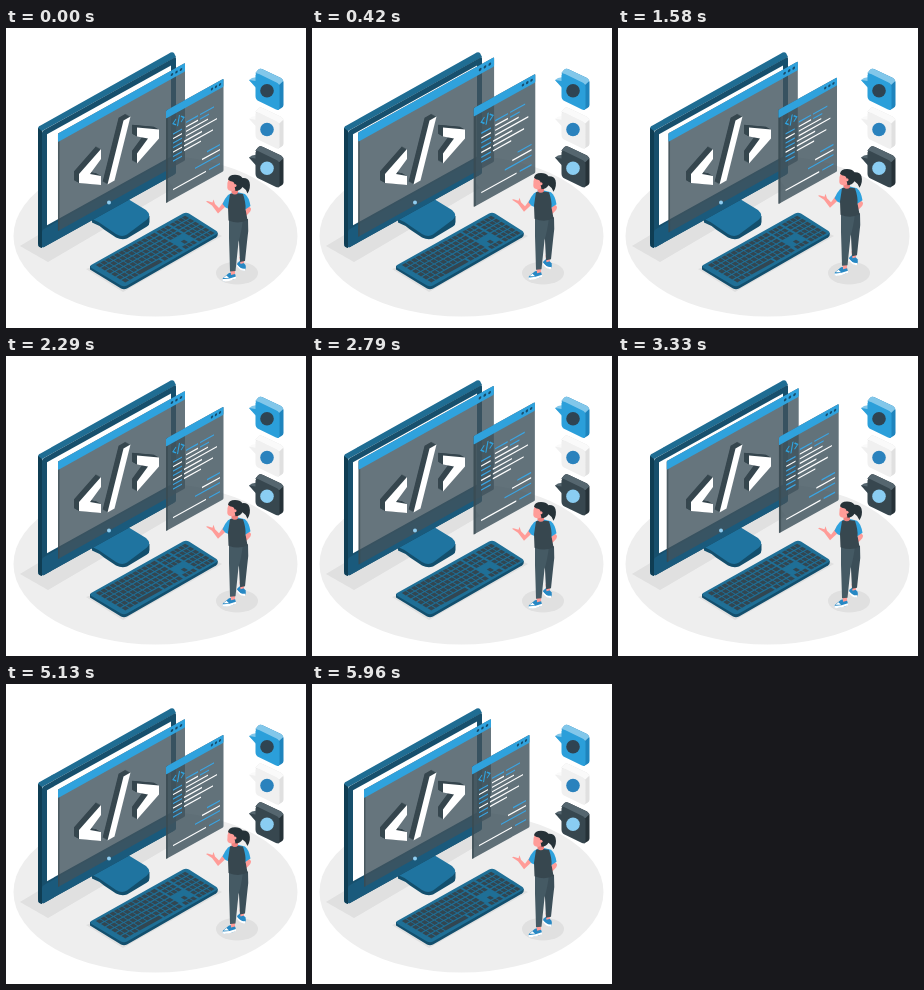
These frames come from a looping animation (300 by 300 pixels, 6 s). An HTML page:

```html
<!DOCTYPE html>
<html lang="en">
<head>
<meta charset="utf-8">
<title>Front-end developer</title>
<style>
  /* Registered so the drawing is repainted sharply at every scale. */
  @property --zoom { syntax: "<number>"; inherits: false; initial-value: 1; }
  @property --lift { syntax: "<length>"; inherits: false; initial-value: 0px; }
  html, body { margin: 0; width: 100%; height: 100%; overflow: hidden; background: #fff; }
  svg { display: block; width: 100vw; height: 100vh; }
  .window {
    transform-origin: 135px 118px;
    transform: scale(var(--zoom));
    animation: pulse 6s linear infinite;
  }
  #girl { transform: translateY(var(--lift)); animation: float 3s linear infinite; }
  @keyframes pulse {
    0%, 30%, 40%, 59%, 100% { --zoom: 1; }
    10%, 50% { --zoom: 1.1; }
  }
  @keyframes float {
    0%, 100% { --lift: 0px; }
    50% { --lift: -6px; }
  }
</style>
</head>
<body>
<svg viewBox="0 0 300 300">
  <ellipse cx="149.500" cy="208" rx="142" ry="80.500" fill="#eee"/>
  <path d="M14 218L34 206 160 150 168 160 42 234Z" fill="#e0e0e0"/>
  <path d="M80 241L117 264 216 208 200 200Z" fill="#e0e0e0"/>
  <ellipse cx="231" cy="245" rx="21" ry="11.500" fill="#e0e0e0"/>

  <!-- stand -->
  <path d="M86 191V194.500Q93 197 98 201.500L110 209.500Q116 212.500 121 210.500L141 198.500Q143.500 197 143.500 194V188Z" fill="#134f6d"/>
  <path d="M86 191L122 171 140 182Q146 187.500 141 191.500L121 206.500Q116 209.500 110 206L99 198.500Q93 193.500 86 191Z" fill="#1f74a0"/>

  <!-- monitor -->
  <path d="M32 101Q32 98 34.500 97.500L163 25.500Q166 23.500 168 25L170 29 36 103V220L33.500 219Q32 218 32 215Z" fill="#1f6d93"/>
  <path d="M32 100L36 103V220L33.500 219Q32 218 32 215Z" fill="#0f3d53"/>
  <g transform="matrix(1 -.555 0 1 36 103)">
    <rect width="134" height="117" rx="2" fill="#174f6c"/>
    <rect y="99" width="134" height="18" rx="2" fill="#1a5a7c"/>
    <rect x="5" y="6" width="124" height="91" fill="#fff"/>
  </g>

  <g class="window" transform-box="view-box">
    <g transform="matrix(1 -.555 0 1 52 105.500)">
      <rect width="127" height="97.500" rx="1" fill="#40535d" opacity=".8"/>
      <rect width="1.500" height="97.500" fill="#37474f" opacity=".6"/>
      <rect width="127" height="8.500" rx="1" fill="#2fa2dd"/>
      <g fill="#184c6b">
        <circle cx="114" cy="4.300" r="1.300"/><circle cx="118.500" cy="4.300" r="1.300"/><circle cx="123" cy="4.300" r="1.300"/>
      </g>
    </g>
  </g>
  <g id="symbol"></g>
  <g class="window">
    <g transform="matrix(1 -.555 0 1 160 82.500)">
      <rect width="57.500" height="92.500" rx="1" fill="#40535d" opacity=".82"/>
      <rect width="2" height="92.500" fill="#37474f" opacity=".6"/>
      <rect width="57.500" height="8" rx="1" fill="#2fa2dd"/>
      <g fill="#184c6b">
        <circle cx="46" cy="4" r="1.200"/><circle cx="50" cy="4" r="1.200"/><circle cx="54" cy="4" r="1.200"/>
      </g>
      <path d="M10 14l-3 3 3 3M13.500 12l-2 10M15 14l3 3-3 3" fill="none" stroke="#2fa2dd" stroke-width="1.200"/>
      <g id="code" stroke-width="1.300"></g>
    </g>
  </g>
  <circle cx="103" cy="174.500" r="2" fill="#8fcdf0"/>

  <!-- keyboard -->
  <path d="M84 238V241.500L115 260.500Q118 262 121 260.500L210 209.500Q212 208 212 205Z" fill="#134f6d"/>
  <path d="M86 236.500L177 185.500Q180 184 183 185.500L210.500 203Q213 205 210 206.500L121 257.500Q118 259 115 257.500L85.500 240Q83 238 86 236.500Z" fill="#1f6f96"/>
  <g id="keys" transform="matrix(.96 -.53 .34 .2 84 238)" fill="#324651"></g>

  <g id="tiles"></g>

  <g id="girl">
    <!-- legs and shoes -->
    <path d="M231.500 235L235 232 239.500 237Q240.500 241 238.500 242.500Q236 243 231 236.500Z" fill="#2788c4"/>
    <path d="M231 236.500Q235 241.500 239.500 240.500L239 242.800Q235 243.500 230.800 238Z" fill="#fff"/>
    <path d="M233.500 229H238V235L234.500 236Z" fill="#ff9c98"/>
    <path d="M223 245L228.500 244 230 249Q229 251.500 225 252L218 253.300Q215.500 252.500 217 250Z" fill="#2788c4"/>
    <path d="M216.300 251Q222 251.500 230 248.500V250.500Q225 253 218 253.600Q215.800 253 216.300 251Z" fill="#fff"/>
    <path d="M217.500 250L220.500 247.500 223 250Z" fill="#fff"/>
    <path d="M224.500 240H229V246L225 247Z" fill="#ff9c98"/>
    <path d="M230 191H242Q243 203 241 214L239 233 234 234 233 214Z" fill="#3b4e58"/>
    <path d="M223 191H237Q235.500 204 232.500 214L229.500 243 224 243.500Q223.500 225 223 210Z" fill="#455a64"/>
    <!-- arms -->
    <path d="M220 178L212 185.500 206 177.500 200 173.500 201.500 173 206.500 174.500 207.500 171.500 209 176 213 180 219 172Z" fill="#ff9c98"/>
    <path d="M239 174L245 180.500Q245.500 183 241 187L237.500 190 236 187 240 182Z" fill="#ff9c98"/>
    <!-- torso -->
    <path d="M222 167Q226 164 231 164L239 166Q243 169 244.500 178L238.500 182 223 181 219.500 179.500 216.500 176Q219 170 222 167Z" fill="#2fa2dd"/>
    <path d="M224 166L229 165 237 166Q240 175 239.500 181L241.500 192Q233 196.500 222.500 192.500L222 179Z" fill="#37474f"/>
    <!-- head -->
    <path d="M225.500 160L232 158V165Q229 168 225.500 165Z" fill="#f0827f"/>
    <path d="M223 150Q221 154 221.300 160Q222 163.500 227 163L232 160V150Z" fill="#ff9c98"/>
    <path d="M222 151.500Q222.500 147 229 146.800Q234 146.800 236.500 150Q242 149.500 243.500 154Q245 160 241.500 165.500Q240 161 236.500 159Q234 163 229.500 163L228.500 158Q229 154 226 153.500Q224 153.500 222 151.500Z" fill="#263238"/>
    <circle cx="229" cy="157.500" r="1.500" fill="#ff9c98"/>
  </g>
</svg>
<script>
  const byId = id => document.getElementById(id);

  // Extruded </>: dark copies run back from the white face.
  const bracket = "M95 121L73 146V155L95 157V148L84 146 95 131Z";
  const slash = "M101.500 156.500L108.500 152.500 124.500 88.500 117.500 92.500Z";
  let symbol = "";
  for (let i = 11; i >= 0; i--) {
    symbol += `<g transform="translate(${-i * .45} ${-i * .25})" fill="${i ? "#37474f" : "#fff"}">
      <path d="${bracket}"/><path d="${slash}"/>
      <path d="${bracket}" transform="rotate(180 113 128.250)"/></g>`;
  }
  byId("symbol").innerHTML = symbol;

  // Code lines: x, y, length, blue?
  const lines = [
    [20, 23, 12, 1], [34, 23, 14, 1],
    [7, 27.5, 9, 1], [20, 27.5, 12, 0], [34, 27.5, 9, 1],
    [7, 32, 9, 0], [20, 32, 22, 0],
    [7, 36.500, 9, 1], [20, 36.500, 31, 0],
    [7, 41, 9, 1], [18, 41, 18, 0],
    [7, 45.500, 9, 0], [18, 45.500, 29, 0],
    [7, 50, 9, 1], [18, 50, 17, 0],
    [7, 54.500, 9, 1],
    [41, 64, 13, 1], [36, 69, 18, 0], [29, 74, 25, 1],
    [7, 83, 33, 0], [43, 83, 11, 1]
  ];
  byId("code").innerHTML = lines.map(([x, y, len, blue]) =>
    `<path d="M${x} ${y}h${len}" stroke="${blue ? "#3aa5e4" : "#fff"}"/>`).join("");

  // Keyboard on a 100 x 100 plane: main block, cursor block, number pad.
  let keys = "";
  const key = (x, y, w) => keys += `<rect x="${x}" y="${y}" width="${w}" height="11.500"/>`;
  for (let row = 0; row < 6; row++) {
    const y = 6 + row * 15;
    if (row == 5) {
      [0, 5, 10].forEach(x => key(4 + x, y, 4));
      key(19, y, 24);
      [45, 50, 55, 60].forEach(x => key(x, y, 4));
    } else {
      for (let col = 0; col < 13; col++) key(4 + col * 4.7, y, col == 12 ? 4.6 : 3.8);
    }
    for (let col = 0; col < 3; col++) {
      if (row < 3 || row == 5 || row == 4 && col == 1) key(67 + col * 4.2, y, 3.4);
    }
    for (let col = 0; col < 4; col++) key(81 + col * 4.2, y, 3.4);
  }
  byId("keys").innerHTML = keys;

  // Speech tiles: face, top, side, badge
  const tiles = [
    ["#2b9fda", "#82c7ea", "#1f84bd", "#2f4452"],
    ["#f0f0f0", "#fafafa", "#e0e0e0", "#2a82bd"],
    ["#37474f", "#55666f", "#263238", "#8acdf2"]
  ];
  byId("tiles").innerHTML = tiles.map(([face, top, side, badge], i) => `
    <g transform="translate(0 ${i * 38.700})">
      <path d="M243 52L246 50 251 49 253 55 250 60Z" fill="${top}"/>
      <path d="M249.500 45L252 42Q254 40 257 41.500L275 50Q277.500 52 277.500 54V77Q277.500 79 275.500 80L272 82Z" fill="${side}"/>
      <path d="M249.500 45L252 42Q254 40 257 41.500L275 50Q277 51.500 277.300 53L273 57Z" fill="${top}"/>
      <path d="M249.500 47Q250 44.500 253 46L270.500 54.500Q273.500 56 273.500 59V79Q273.500 83 270 81.500L252.500 73Q249.500 71.500 249.500 68V59L243 52 249.500 53Z" fill="${face}"/>
      <circle cx="261" cy="62.800" r="6.800" fill="${badge}"/>
    </g>`).join("");
</script>
</body>
</html>
```
